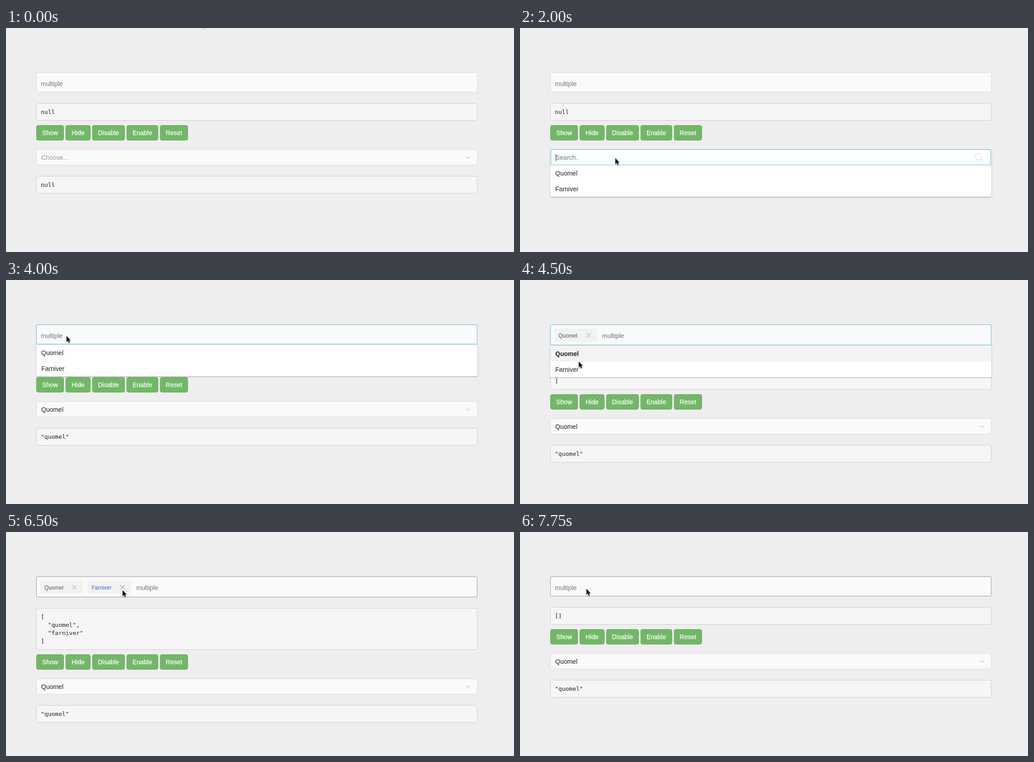
Write an HTML page that moves like this. It is 1124 px wide and 498 px high and loops after 8 s.

```html
<!DOCTYPE html>
<html lang="en">
<head>
<meta charset="utf-8">
<title>Select fields</title>
<style>
  html, body { margin: 0; width: 100%; height: 100%; overflow: hidden; background: #eee; }
  svg { display: block; width: 1124px; height: 498px; }
  text { font: 14px "Liberation Sans", Arial, sans-serif; white-space: pre; }
  .mono { font: 13px "DejaVu Sans Mono", monospace; }
  .small { font-size: 12px; }
  .bold { font-weight: bold; }
  .shadow { filter: drop-shadow(0 1px 1.5px rgba(0, 0, 0, .32)); }
  .line { fill: none; stroke-width: 1; }
</style>
</head>
<body>
<svg id="stage" viewBox="0 0 1124 498"></svg>
<script>
const LOOP = 8000, STEP = 250;
const LEFT = 67, WIDTH = 976;
const BLUE = '#5ab9dc', HOVER = '#999', REST = '#dcdcdc';
const OPTIONS = ['Quomel', 'Farniver'];
const TAG_WIDTHS = [94, 96];

// Each entry starts at its time and changes only the properties it lists.
const timeline = [
  [0, { cursor: null, remnant: true, tags: 0, code: 'null', value: null, single: REST, multi: REST,
        open: null, hover: -1, hotTag: -1 }],
  [250, { remnant: false }],
  [1250, { cursor: [44, 383] }],
  [1500, { cursor: [142, 231] }],
  [1750, { cursor: [206, 284], single: HOVER }],
  [2000, { cursor: [210, 289], open: 'single' }],
  [2250, { cursor: [172, 318], hover: 0 }],
  [2500, { cursor: [150, 322], open: null, hover: -1, value: OPTIONS[0], single: BLUE }],
  [2750, { cursor: [62, 406] }],
  [3000, { cursor: [11, 330] }],
  [3250, { cursor: [44, 257] }],
  [3500, { cursor: [104, 146], single: REST }],
  [3750, { cursor: [130, 120], multi: HOVER }],
  [4000, { cursor: [133, 124], multi: BLUE, open: 'multi' }],
  [4250, { cursor: [131, 160], hover: 0 }],
  [4500, { cursor: [129, 181], tags: 1 }],
  [4750, { cursor: [128, 196], hover: 1 }],
  [5000, { tags: 2 }],
  [5250, { cursor: [60, 232], hover: -1 }],
  [5500, { cursor: [47, 245], open: null, multi: REST }],
  [5750, { cursor: [96, 212] }],
  [6000, { cursor: [215, 150] }],
  [6250, { cursor: [254, 131], multi: HOVER }],
  [6500, { cursor: [257, 129], hotTag: 1 }],
  [7000, { cursor: [235, 127], tags: 1, hotTag: -1 }],
  [7250, { cursor: [150, 123], hotTag: 0 }],
  [7500, { cursor: [150, 124], tags: 0, hotTag: -1, code: '[]' }],
  [7750, { cursor: [146, 126] }]
];

const stateAt = time =>
  Object.assign({}, ...timeline.filter(([start]) => start <= time).map(([, change]) => change));

const rect = (x, y, w, h, fill, extra = '') =>
  `<rect x="${x}" y="${y}" width="${w}" height="${h}" fill="${fill}" ${extra}/>`;

const frame = (x, y, w, h, fill, stroke, radius = 0) =>
  rect(x + .5, y + .5, w - 1, h - 1, fill, `stroke="${stroke}" rx="${radius}"`);

const label = (x, y, words, color = '#222', style = '') =>
  `<text x="${x}" y="${y}" fill="${color}" class="${style}">${words}</text>`;

const path = (d, stroke) => `<path class="line" d="${d}" stroke="${stroke}"/>`;

function codeBlock(y, lines) {
  return frame(LEFT, y, WIDTH, 21 + 18 * lines.length, '#f6f6f6', '#ccc', 4) +
    lines.map((line, i) => label(77, y + 24 + 18 * i, line, '#222', 'mono')).join('');
}

function buttons(y) {
  const widths = { Show: 61, Hide: 55, Disable: 72, Enable: 70, Reset: 62 };
  let x = LEFT;
  return Object.entries(widths).map(([name, w]) => {
    const button = frame(x, y, w, 34, '#73b768', '#60a855', 4) +
      label(x + w / 2, y + 22, name, '#fff').replace('<text', '<text text-anchor="middle" stroke="#fff" stroke-width=".25"');
    x += w + 3.9;
    return button;
  }).join('');
}

function optionList(y, state) {
  return OPTIONS.map((name, i) => {
    const top = y + 35 * i;
    const chosen = state.open === 'multi' && i < state.tags;
    return rect(LEFT, top, WIDTH, 35, i === state.hover ? '#f3f3f3' : '#fff') +
      label(78, top + 23, name, '#222', chosen ? 'bold' : '');
  }).join('');
}

function multiField(state, height) {
  let x = 76, out = frame(LEFT, 99, WIDTH, height, '#fafafa', state.multi, 1);
  for (let i = 0; i < state.tags; i++) {
    const hot = i === state.hotTag, w = TAG_WIDTHS[i], cross = x + w - 19;
    out += rect(x, 108, w, 29, '#f2f2f2', 'rx="2"') +
      label(x + 9, 127.5, OPTIONS[i], hot ? '#2a73bd' : '#555', 'small') +
      path(`M${cross - 4.5} 118l10 10m0-10l-10 10`, hot ? '#3b86cc' : '#999');
    x += w + 10.5;
  }
  return out + label(x + 1.3, 129, 'multiple', '#757575');
}

function singleField(state, y) {
  return frame(LEFT, y, WIDTH, 35, '#fafafa', state.single, 1) +
    label(78, y + 23, state.value || 'Choose...', state.value ? '#222' : '#999') +
    path(`M1018 ${y + 15.5}l4.5 4.5 4.5-4.5`, '#999');
}

function searchPanel(state, y) {
  return `<g class="shadow">${rect(LEFT, y, WIDTH, 105, '#fff')}</g>` +
    optionList(y + 35, state) +
    frame(LEFT + 1, y, WIDTH - 2, 35, '#fff', BLUE) +
    label(79, y + 23, 'Search..', '#757575') +
    path(`M79.5 ${y + 10}v16`, '#222') +
    `<circle class="line" cx="1015" cy="${y + 16.5}" r="7.3" stroke="#ccc"/>` +
    path(`M1020.3 ${y + 21.8}l5.5 5.5`, '#ccc');
}

function pointer([x, y]) {
  return `<path class="shadow" transform="translate(${x} ${y})" stroke="#fff" stroke-width="1.4"
    paint-order="stroke" d="M1 .5V13.5L4 10.7 6.1 15.4 8.2 14.5 6.2 9.9H10Z"/>`;
}

function draw(state) {
  const { tags, value } = state;
  const height = tags ? 46 : 44;
  const shift = tags ? 20 + 18 * tags : 0;
  const quoted = name => `"${name.toLowerCase()}"`;
  const items = OPTIONS.slice(0, tags).map((name, i) => '  ' + quoted(name) + (i < tags - 1 ? ',' : ''));
  const codeLines = tags ? ['[', ...items, ']'] : [state.code];

  let out = rect(0, 0, 1124, 498, '#eee');
  if (state.remnant) out += label(435, 0, 'g', '#b5b5b5', 'small');
  out += multiField(state, height) + codeBlock(123 + height, codeLines) + buttons(216 + shift) +
    singleField(state, 270 + shift) + codeBlock(329 + shift, [value ? quoted(value) : 'null']);
  if (state.open === 'single') out += searchPanel(state, 270);
  if (state.open === 'multi') {
    const top = 100 + height;
    out += `<g class="shadow">${rect(LEFT, top, WIDTH, 70, '#fff')}</g>` + optionList(top, state) +
      path(`M${LEFT} ${top - 1.5}h${WIDTH}`, BLUE);
  }
  if (state.cursor) out += pointer(state.cursor);
  return out;
}

const stage = document.getElementById('stage');
const began = performance.now();
let shown = -1;

function tick() {
  const step = Math.floor((performance.now() - began) % LOOP / STEP);
  if (step !== shown) stage.innerHTML = draw(stateAt(step * STEP));
  shown = step;
  requestAnimationFrame(tick);
}
tick();
</script>
</body>
</html>
```
